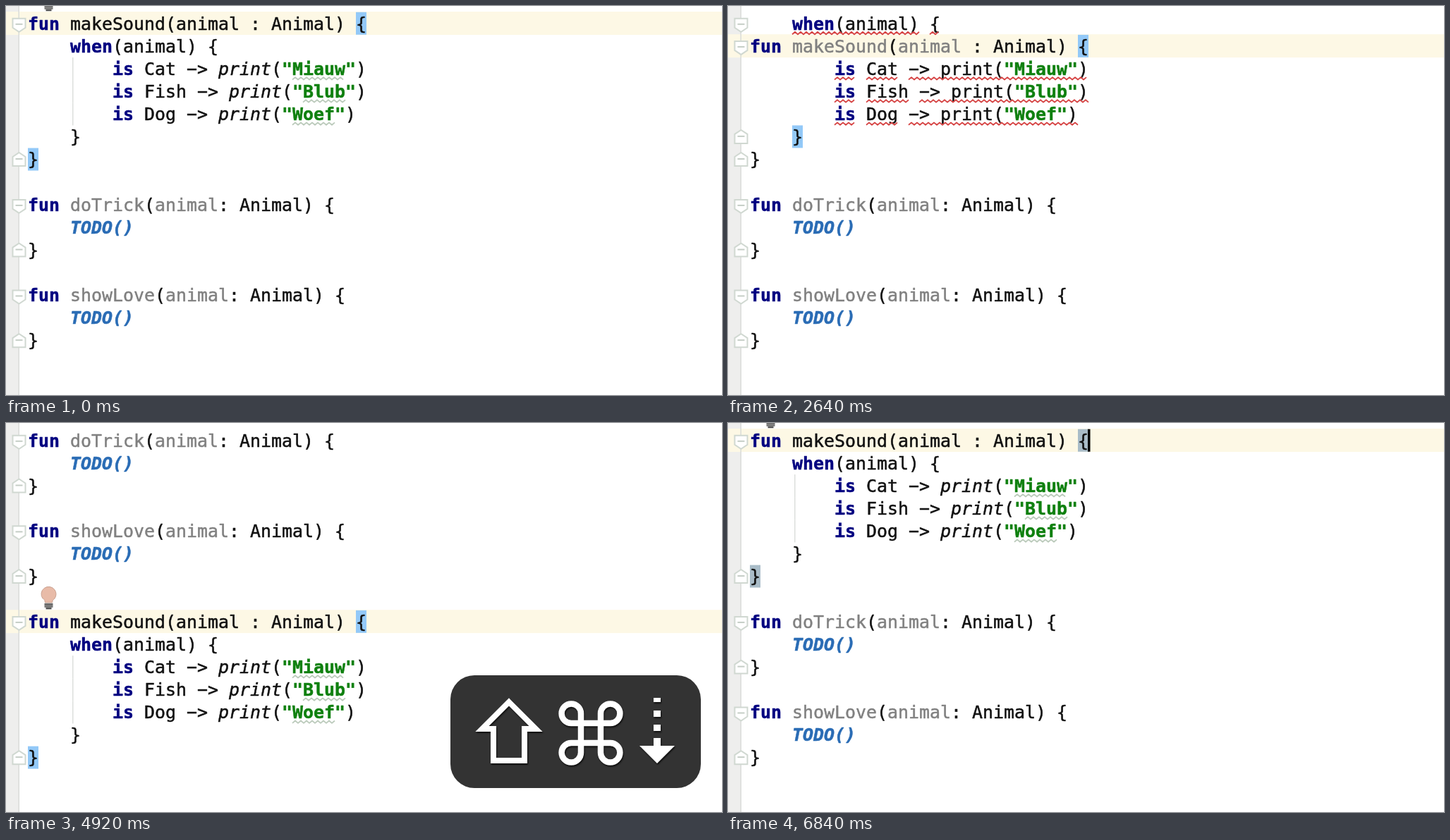
An HTML page with a canvas that plays this animation: 1015x552 px, repeating every 6960 ms.

```html
<!DOCTYPE html>
<html lang="en">
<head>
<meta charset="utf-8">
<title>Moving lines and statements</title>
<style>
html, body { margin: 0; width: 100%; height: 100%; overflow: hidden; background: #fff; }
canvas { display: block; }
</style>
</head>
<body>
<canvas id="stage" width="1015" height="552"></canvas>
<script>
const ctx = document.getElementById('stage').getContext('2d');
const LOOP = 6960, STEP = 120;
const LEFT = 31, CHAR = 15, ROW = 32.14, TOP = 8.7;
const BLINK = 480;
const FAMILY = '24.915px "DejaVu Sans Mono", monospace';

const STYLES = {
  key: ['bold', '#000080'],
  text: ['', '#111'],
  dim: ['', '#808080'],
  call: ['italic', '#111'],
  str: ['bold', '#0f800f'],
  todo: ['italic bold', '#2a6cb5']
};

// Each event puts the header line or the whole function somewhere else.
const MOVES = [
  { at: -BLINK, order: 'MTL', shift: 0 },
  { at: 600, order: 'MTL', shift: 1 },
  { at: 1320, order: 'MTL', shift: 2 },
  { at: 2040, order: 'MTL', shift: 1 },
  { at: 2760, order: 'MTL', shift: 0 },
  { at: 3360, order: 'TML', shift: 0 },
  { at: 4440, order: 'TLM', shift: 0 },
  { at: 5400, order: 'TML', shift: 0 },
  { at: 5880, order: 'MTL', shift: 0 }
];
const BROKEN = [840, 3000];
const BULBS = [[0, 600], [3720, 4440], [4800, 5400], [5640, 5880], [6240, LOOP]];
const KEYS = [
  { from: 600, to: 2040, icons: 'line', down: true },
  { from: 3360, to: 4320, icons: 'block', down: true },
  { from: 4440, to: 5280, icons: 'block', down: true },
  { from: 5400, to: 6720, icons: 'block', down: false }
];

const within = (t, [a, b]) => t >= a && t < b;
const rowTop = r => TOP + r * ROW;
const colX = c => LEFT + c * CHAR;

function rect(color, x, y, w, h) {
  ctx.fillStyle = color;
  ctx.fillRect(x, y, w, h);
}

function trace(points, close) {
  ctx.beginPath();
  points.forEach(([x, y], i) => i ? ctx.lineTo(x, y) : ctx.moveTo(x, y));
  if (close) ctx.closePath();
}

function soundLines(broken, shift) {
  const name = broken ? 'dim' : 'text';
  const clause = (animal, noise) => ({
    clause: true, err: broken, word: noise.length,
    parts: [['        ', 'text'], ['is', 'key'], [` ${animal} −> `, 'text'],
      ['print', broken ? 'text' : 'call'], ['(', 'text'], [`"${noise}"`, 'str'], [')', 'text']]
  });
  const lines = [
    { err: broken, fold: broken && 'start',
      parts: [['    ', 'text'], ['when', 'key'], ['(animal) {', 'text']] },
    clause('Cat', 'Miauw'),
    clause('Fish', 'Blub'),
    clause('Dog', 'Woef'),
    { fold: broken && 'end', match: broken && 4, parts: [['    }', 'text']] },
    { fold: 'end', match: broken ? false : 0, parts: [['}', 'text']] }
  ];
  lines.splice(shift, 0, {
    head: true, fold: 'start', match: 31,
    parts: [['fun', 'key'], [' makeSound', name], ['(', 'text'], ['animal', name],
      [' : Animal) {', 'text']]
  });
  return lines;
}

function todoLines(name) {
  return [
    { fold: 'start', parts: [['fun', 'key'], [' ' + name, 'dim'], ['(', 'text'],
      ['animal', 'dim'], [': Animal) {', 'text']] },
    { parts: [['    TODO()', 'todo']] },
    { fold: 'end', parts: [['}', 'text']] }
  ];
}

function layout(move, broken) {
  const blocks = {
    M: soundLines(broken, move.shift),
    T: todoLines('doTrick'),
    L: todoLines('showLove')
  };
  return [...move.order].flatMap(id => [...blocks[id], { parts: [] }]);
}

function squiggle(from, to, y, color) {
  ctx.beginPath();
  for (let x = from, i = 0; x <= to; x += 4, i++) ctx.lineTo(x, y + (i % 2 ? -1.7 : 1.7));
  ctx.strokeStyle = color;
  ctx.lineWidth = 1.8;
  ctx.stroke();
}

function drawFold(kind, r) {
  const s = kind === 'start' ? 1 : -1;
  const mid = rowTop(r) + 17.3 + s * 0.8;
  trace([[9.5, mid - 9 * s], [27.5, mid - 9 * s], [27.5, mid + 4 * s],
    [18.5, mid + 10 * s], [9.5, mid + 4 * s]], true);
  ctx.fillStyle = '#fff';
  ctx.fill();
  ctx.strokeStyle = '#d0d8d1';
  ctx.lineWidth = 2;
  ctx.lineJoin = 'miter';
  ctx.stroke();
  rect('#c5cec6', 13.5, mid - 2, 10, 2);
}

function drawLine(line, r) {
  const base = rowTop(r) + 24.8;
  let col = 0;
  ctx.lineJoin = 'round';
  for (const [text, style] of line.parts) {
    const [face, color] = STYLES[style];
    ctx.font = `${face} ${FAMILY}`;
    ctx.fillStyle = ctx.strokeStyle = color;
    ctx.lineWidth = 0.5;
    ctx.fillText(text, colX(col), base);
    ctx.strokeText(text, colX(col), base);
    col += text.length;
  }
  const full = line.parts.map(p => p[0]).join('');
  if (line.err) {
    for (const m of full.matchAll(/−.*|\S+/g))
      squiggle(colX(m.index), colX(m.index + m[0].length), base + 5, '#d64545');
  } else if (line.clause) {
    const start = full.indexOf('"') + 1;
    squiggle(colX(start), colX(start + line.word), base + 5, '#bccbbc');
  }
}

function drawBulb(top) {
  const x = 60.5, y = top - 23;
  ctx.beginPath();
  ctx.moveTo(x - 5, y + 12);
  ctx.quadraticCurveTo(x - 5, y + 8, x - 8, y + 6);
  ctx.arc(x, y, 10.5, 2.5, 0.64);
  ctx.quadraticCurveTo(x + 5, y + 8, x + 5, y + 12);
  ctx.closePath();
  ctx.fillStyle = '#e8bba8';
  ctx.fill();
  ctx.strokeStyle = '#caa08f';
  ctx.lineWidth = 1;
  ctx.stroke();
  rect('#666', x - 6, y + 13, 12, 3);
  rect('#777', x - 6, y + 16, 12, 3);
  rect('#555', x - 4, y + 19, 8, 2.5);
}

function optionIcon() {
  ctx.lineWidth = 9.5;
  trace([[664, 403], [695, 403], [733, 478], [762, 478]]);
  ctx.stroke();
  trace([[721, 403], [762, 403]]);
  ctx.stroke();
}

function shiftIcon(x) {
  ctx.lineWidth = 8;
  trace([[x, 396], [x + 38, 434], [x + 22, 434], [x + 22, 479],
    [x - 22, 479], [x - 22, 434], [x - 38, 434]], true);
  ctx.stroke();
}

function commandIcon(x, y) {
  const a = 14, c = 27.7, q = Math.PI / 2;
  ctx.lineWidth = 8.5;
  ctx.beginPath();
  for (const s of [-a, a]) {
    ctx.moveTo(x + s, y - c);
    ctx.lineTo(x + s, y + c);
    ctx.moveTo(x - c, y + s);
    ctx.lineTo(x + c, y + s);
  }
  // Corner loops, each three quarters of a circle.
  [[1, 1, -1], [-1, 1, 0], [-1, -1, 1], [1, -1, 2]].forEach(([sx, sy, k]) => {
    const from = k * q;
    const cx = x + sx * c, cy = y + sy * c, rad = c - a;
    ctx.moveTo(cx + rad * Math.cos(from), cy + rad * Math.sin(from));
    ctx.arc(cx, cy, rad, from, from + 3 * q);
  });
  ctx.stroke();
}

function dashedArrow(down) {
  const flip = y => down ? y : 873 - y;
  ctx.fillStyle = '#fff';
  for (const [a, b] of [[390, 396], [408, 417], [428, 437], [447, 459]])
    ctx.fillRect(918, Math.min(flip(a), flip(b)), 10, b - a);
  trace([[898, flip(458)], [948, flip(458)], [923, flip(483)]], true);
  ctx.fill();
}

function drawKeys(key, t) {
  ctx.save();
  ctx.globalAlpha = Math.min(1, (key.to - t) / 240);
  ctx.beginPath();
  ctx.roundRect(630, 358, 355, 160, 34);
  ctx.fillStyle = '#333';
  ctx.fill();
  ctx.strokeStyle = '#fff';
  ctx.lineJoin = 'miter';
  ctx.shadowColor = '#111';
  ctx.shadowOffsetX = 1;
  ctx.shadowOffsetY = 2;
  ctx.shadowBlur = 2;
  if (key.icons === 'line') {
    optionIcon();
    shiftIcon(829);
  } else {
    shiftIcon(713);
    commandIcon(829, 440);
  }
  dashedArrow(key.down);
  ctx.restore();
}

function draw(t) {
  const move = MOVES.filter(m => m.at <= t).pop();
  const broken = within(t, BROKEN);
  const lines = layout(move, broken);
  const head = lines.findIndex(l => l.head);
  const top = rowTop(head);

  rect('#fff', 0, 0, 1015, 552);
  rect('#eeeeed', 0, 0, 18, 552);
  rect(move.shift === 2 ? '#eeefee' : '#fdf8e5', 0, top - 0.7, 1015, 33);
  rect('#d9dcd9', 17.5, 0, 1.5, 552);

  lines.forEach((line, r) => {
    if (typeof line.match === 'number')
      rect(t >= 6600 ? '#a9bcc8' : '#93c9f8', colX(line.match), rowTop(r), CHAR, 32);
    if (line.clause && (!broken || r < head)) rect('#dcdfdc', 94, rowTop(r), 1.5, ROW);
    drawLine(line, r);
    if (line.fold) drawFold(line.fold, r);
  });

  if (Math.floor((t - move.at) / BLINK) % 2 === 0) rect('#000', 510, top, 3.5, 32);
  if (BULBS.some(span => within(t, span))) drawBulb(top);
  const key = KEYS.find(k => within(t, [k.from, k.to]));
  if (key) drawKeys(key, t);
}

const start = performance.now();
function tick() {
  const t = (performance.now() - start) % LOOP;
  draw(Math.floor(t / STEP) * STEP);
  requestAnimationFrame(tick);
}
tick();
</script>
</body>
</html>
```
